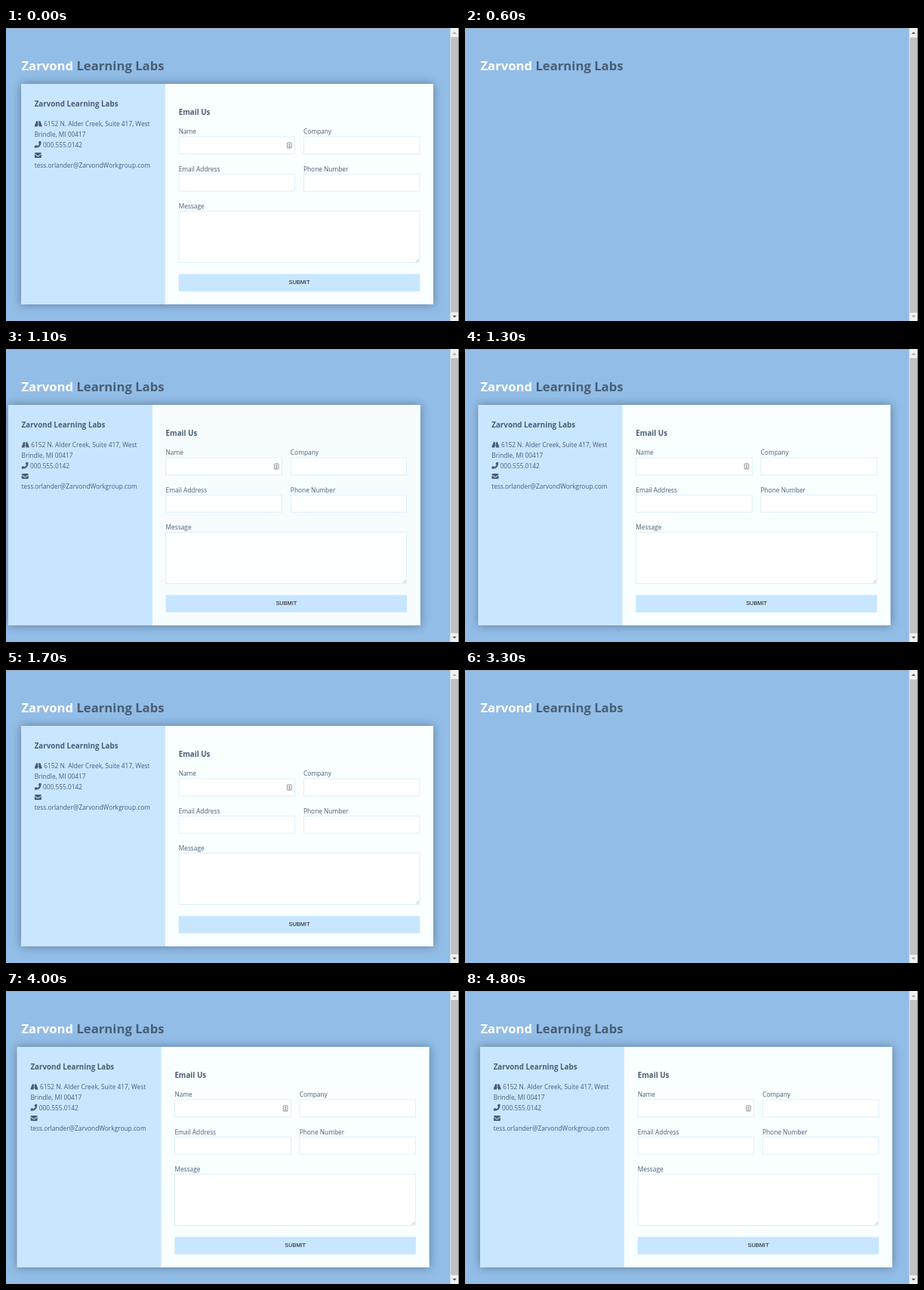
An HTML page that plays this animation: 600x388 px, repeating every 5.8 s.

```html
<!DOCTYPE html>
<html lang="en">
<head>
<meta charset="utf-8">
<title>Contact form</title>
<style>
  html, body { margin: 0; width: 100%; height: 100%; overflow: hidden; }
  body { position: relative; background: #92bde7; }
  svg { position: absolute; left: 0; top: 0; display: block; }
  text { font-family: "Open Sans", "Noto Sans", sans-serif; font-size: 8.35px; fill: #485e74; }
  .brand { font-size: 16.7px; font-weight: 700; }
  .head { font-size: 9.8px; font-weight: 700; }
  .button { font-family: "Liberation Sans", Arial, sans-serif; font-size: 7.4px; fill: #111; text-anchor: middle; }
  .field { fill: #fff; stroke: #c9e6ff; stroke-width: .6; }
  .icon { fill: #485e74; }
  #card {
    position: absolute; left: 20.3px; top: 74.3px; width: 545.6px; height: 292.2px;
    background: #f9feff; box-shadow: 0 0 11.2px rgba(72, 94, 116, .7);
  }
</style>
</head>
<body>
<svg width="600" height="388">
  <text id="brand" class="brand" x="20.4" y="56.2"><tspan fill="#fff">Zarvond</tspan> Learning Labs</text>
</svg>

<div id="card">
  <svg width="545.6" height="292.2" viewBox="20.3 74.3 545.6 292.2">
    <rect x="20.3" y="74.3" width="190.9" height="292.2" fill="#c9e6ff"/>
    <text class="head" x="38" y="104.6">Zarvond Learning Labs</text>
    <text x="50.6" y="130">6152 N. Alder Creek, Suite 417, West</text>
    <text x="38" y="144">Brindle, MI 00417</text>
    <text x="49.3" y="158">000.555.0142</text>
    <text x="38" y="185.8">tess.orlander@ZarvondWorkgroup.com</text>

    <path class="icon" d="M40.4 123.6h2.1l-.1 1.4h1.3l-.1-1.4h2.1l2.3 6.2q.2.9-.6.9h-3.5l-.2-2.1h-1.3l-.2 2.1h-3.5q-.8 0-.6-.9zM42.4 125.9l-.1 1.6h1.5l-.1-1.6z" fill-rule="evenodd"/>
    <path class="icon" d="M46.6 150.5l-1.9-.4q-.4 0-.6.3l-.8 2q-.1.4.2.6l1 .9q-.9 1.8-2.7 2.7l-.9-1q-.3-.3-.6-.2l-2 .8q-.3.2-.3.6l.4 1.9q.1.4.6.4 8.1-.5 8-8.1 0-.4-.4-.5z"/>
    <path class="icon" d="M39.2 165.2h7q1 0 1 1v.3l-4 2.9q-.5.3-1 0l-4-2.9v-.3q0-1 1-1zM38.2 167.5l3.7 2.7q.8.5 1.6 0l3.7-2.7v3.7q0 1-1 1h-7q-1 0-1-1z"/>

    <text class="head" x="229" y="114.9">Email Us</text>
    <g id="fields"></g>
    <g fill="none" stroke="#777" stroke-width=".8">
      <rect x="372.9" y="152.2" width="5.6" height="7.2" rx=".6"/>
      <path d="M374.3 157.7h2.8M375.7 155.6v1.6"/>
      <circle cx="375.7" cy="154.7" r=".7"/>
    </g>
    <path d="M543.4 309.8l3.8-3.8M545.6 309.8l1.6-1.6" stroke="#8b8b8b" stroke-width=".6"/>
    <rect x="229" y="326" width="319.5" height="23" fill="#c9e6ff"/>
    <text class="button" x="388.8" y="339.8">SUBMIT</text>
  </svg>
</div>

<svg width="600" height="388">
  <rect width="600" height=".8" fill="#9ba9b7"/>
  <rect x="588.4" width="11.6" height="388" fill="#f1f1f1"/>
  <rect id="thumb" x="589.2" y="12" width="9.8" height="364.5" fill="#c1c1c1"/>
  <path id="up" d="M591.4 7.8l2.7-2.9 2.7 2.9z"/>
  <path id="down" d="M591.4 380.7l2.7 2.9 2.7-2.9z"/>
  <rect x="599" width="1" height="388" fill="#777b80"/>
</svg>

<script>
const LOOP = 5800, TICK = 100, LENGTH = 1000;
const $ = id => document.getElementById(id);

// label, x, y, width, height
const fields = [
  ["Name", 229, 144, 154.2, 23.5],
  ["Company", 394.3, 144, 154.2, 23.5],
  ["Email Address", 229, 193.2, 154.2, 23.5],
  ["Phone Number", 394.3, 193.2, 154.2, 23.5],
  ["Message", 229, 242.5, 319.5, 68.8]
];
$("fields").innerHTML = fields.map(([label, x, y, w, h]) =>
  `<text x="${x}" y="${y - 3.3}">${label}</text>
   <rect class="field" x="${x + .3}" y="${y + .3}" width="${w - .6}" height="${h - .6}"/>`).join("");

// Bounce in from the left: offset, x, opacity
const bounce = $("card").animate(
  [[0, -1680, 0], [.6, 14, 1], [.75, -5.6, 1], [.9, 2.8, 1], [1, 0, 1]].map(([offset, x, opacity]) => ({
    offset, opacity,
    transform: `translateX(${x}px)`,
    easing: "cubic-bezier(.215, .61, .355, 1)"
  })),
  { duration: LENGTH, fill: "both" }
);
bounce.pause();

// Page reloads: when the view blanks, when the bounce begins
const reloads = [{ blank: 600, begin: 633 }, { blank: 3300, begin: 3280 }];

function draw(ms) {
  const t = Math.floor(ms / TICK) * TICK;
  const run = reloads.filter(r => t >= r.blank).pop();
  bounce.currentTime = run ? Math.min(LENGTH, Math.max(0, t - run.begin)) : LENGTH;

  const scrolled = Boolean(run) && t < run.blank + TICK;
  $("brand").setAttribute("y", scrolled ? 55.7 : 56.2);
  $("thumb").setAttribute("y", scrolled ? 12.6 : 12);
  $("up").setAttribute("fill", scrolled ? "#505050" : "#a3a3a3");
  $("down").setAttribute("fill", scrolled ? "#a3a3a3" : "#505050");
}

const start = performance.now();
function loop() {
  draw((performance.now() - start) % LOOP);
  requestAnimationFrame(loop);
}
loop();
</script>
</body>
</html>
```
